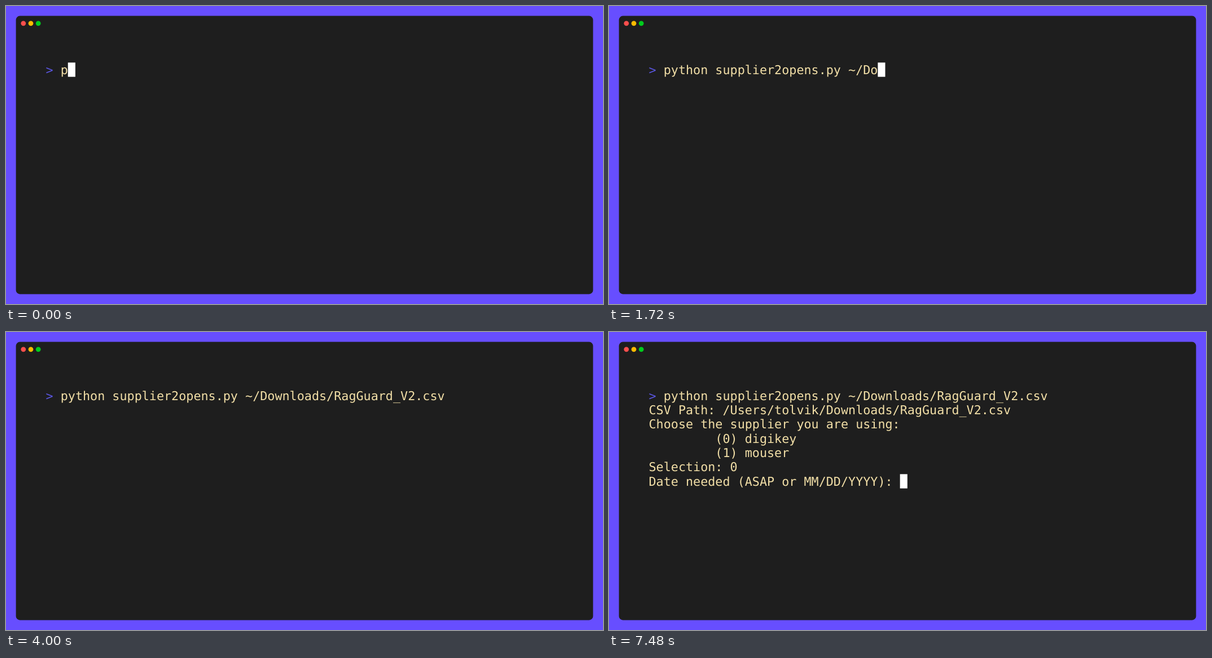
An HTML page for the animation above (8000 ms loop, 1058 by 529 pixels).

```html
<!DOCTYPE html>
<html lang="en">
<head>
<meta charset="utf-8">
<title>Terminal session</title>
<style>
  html, body { margin: 0; width: 100%; height: 100%; overflow: hidden; background: #674eff; }
  svg { display: block; width: 1058px; height: 529px; }
  text {
    font: 21.75px "DejaVu Sans Mono", monospace;
    white-space: pre;
    text-rendering: geometricPrecision;
    fill: #f2dfa7;
  }
  .prompt { fill: #5a56e0; }
</style>
</head>
<body>
<svg viewBox="0 0 1058 529">
  <rect width="1058" height="529" fill="#674eff"/>
  <rect x="17.6" y="17.6" width="1022.8" height="493.8" rx="7" fill="#1e1e1e"/>
  <circle cx="30.8" cy="30.8" r="4.4" fill="#ff4f4d"/>
  <circle cx="44" cy="30.8" r="4.4" fill="#febb00"/>
  <circle cx="57.2" cy="30.8" r="4.4" fill="#00cc1d"/>
  <g id="screen"></g>
  <rect id="cursor" width="13.1" height="25.3" fill="#fff"/>
</svg>
<script>
const LOOP = 8000, TICK = 40;
const LEFT = 70.5, TOP = 100.4, CELL_W = 13.094, CELL_H = 25.32, ASCENT = 20.2;

const command = "python supplier2opens.py ~/Downloads/RagGuard_V2.csv";

// Output rows: [row, appears at, text]
const output = [
  [1, 5480, "CSV Path: /Users/tolvik/Downloads/RagGuard_V2.csv"],
  [2, 5480, "Choose the supplier you are using:"],
  [3, 5480, "         (0) digikey"],
  [4, 5480, "         (1) mouser"],
  [5, 5480, "Selection: "],
  [6, 7440, "Date needed (ASAP or MM/DD/YYYY): "]
];
const ANSWER_AT = 6800;

// Typing rhythm: [characters on screen, time]
const rhythm = [
  [1, 0], [2, 40], [15, 840], [16, 920], [21, 1240], [22, 1320], [29, 1720],
  [30, 1800], [36, 2200], [37, 2280], [42, 2600], [43, 2640], [48, 2960],
  [49, 3040], [52, 3240]
];

// Cursor after typing: [time, row, column], hidden without a position
const cursorSteps = [
  [4000], [4560, 1, 0], [5240], [5520, 5, 11], [6200], [6840, 5, 12], [7480, 6, 34]
];

const screen = document.getElementById("screen");
const cursor = document.getElementById("cursor");

function addText(row, col, content = "", className = "") {
  const el = document.createElementNS("http://www.w3.org/2000/svg", "text");
  el.setAttribute("x", LEFT + col * CELL_W);
  el.setAttribute("y", TOP + row * CELL_H + ASCENT);
  el.setAttribute("class", className);
  el.textContent = content;
  return screen.appendChild(el);
}

addText(0, 0, ">", "prompt");
const typed = addText(0, 2);
const rows = output.map(([row, at, content]) => ({ el: addText(row, 0, content), at }));
const answer = addText(5, 11, "0");

function typedCount(t) {
  const i = rhythm.findLastIndex(([, at]) => at <= t);
  if (i === rhythm.length - 1) return command.length;
  const [n0, t0] = rhythm[i], [n1, t1] = rhythm[i + 1];
  return Math.floor(n0 + (n1 - n0) * (t - t0) / (t1 - t0) + 1e-6);
}

function show(el, on) {
  el.setAttribute("visibility", on ? "visible" : "hidden");
}

function draw(time) {
  const t = Math.floor(time % LOOP / TICK) * TICK;
  const count = typedCount(t);
  typed.textContent = command.slice(0, count);
  rows.forEach(({ el, at }) => show(el, t >= at));
  show(answer, t >= ANSWER_AT);

  const step = cursorSteps.findLast(([at]) => at <= t) || [0, 0, count + 2];
  const [, row, col] = step;
  show(cursor, row !== undefined);
  if (row !== undefined) {
    cursor.setAttribute("x", LEFT + col * CELL_W);
    cursor.setAttribute("y", TOP + row * CELL_H);
  }
}

const start = performance.now();
function frame() {
  draw(performance.now() - start);
  requestAnimationFrame(frame);
}
frame();
</script>
</body>
</html>
```
